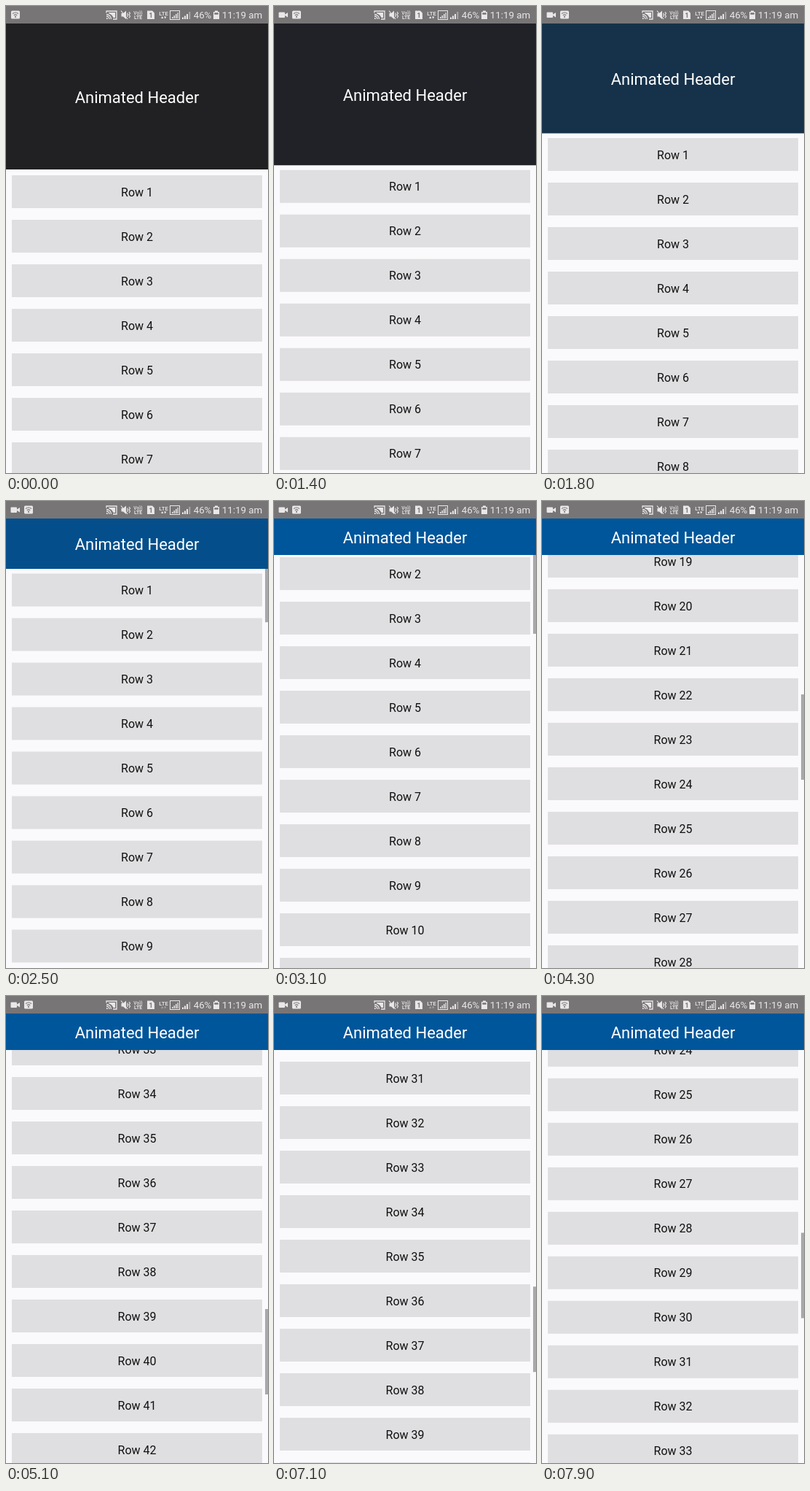
These frames come from a looping animation (360x640 px, 8 s). An HTML page:

```html
<!DOCTYPE html>
<html lang="en">
<head>
<meta charset="utf-8">
<title>Animated Header</title>
<style>
  html, body { margin: 0; width: 100%; height: 100%; overflow: hidden; background: #faf9fb; }
  svg { display: block; width: 100vw; height: 100vh; }
  text { font-family: Roboto, sans-serif; text-anchor: middle; }
  #rows rect { fill: #dfdee0; }
  #rows text { font-size: 16px; fill: #111; }
  #title { font-size: 22px; fill: #fff; }
  #status { fill: #e9e7e8; }
  #status .line { fill: none; stroke: #e9e7e8; }
  #status .cut { fill: #787577; }
</style>
</head>
<body>
<svg viewBox="0 0 360 640">
  <rect width="360" height="640" fill="#faf9fb"/>
  <g id="rows"></g>
  <rect id="thumb" x="356" width="4" height="117" fill="#a9a8aa"/>
  <rect id="header" y="24" width="360"/>
  <text id="title" x="180">Animated Header</text>

  <rect width="360" height="24" fill="#787577"/>
  <g id="status">
    <g id="camera">
      <rect x="6.5" y="8.5" width="8.5" height="7.5" rx="1"/>
      <path d="M15 11.5L19 9v6.500L15 13z"/>
    </g>
    <g id="wifi">
      <rect x="7" y="6.500" width="12" height="11" rx="1.500"/>
      <path d="M9 10.500q4-3 8 0M10.800 12.700q2.200-1.600 4.400 0" fill="none" stroke="#787577" stroke-width="1.200"/>
      <circle class="cut" cx="13" cy="14.800" r="1.100"/>
    </g>

    <path class="line" stroke-width="1.300" d="M138 9.500V7h14v11h-5M138 11.500a6.500 6.500 0 0 1 6.500 6.500M138 14a4 4 0 0 1 4 4"/>
    <path d="M138 16a2 2 0 0 1 2 2h-2zM141 9h9v7h-2.500a10 10 0 0 0-6.500-6z"/>

    <path d="M158.500 10h2.500l4-3.500v11.500l-4-3.500h-2.500z"/>
    <path class="line" stroke-width="1.200" d="M158 6.500L167 18M167 9.500v5.500M169 8l1.500 2-1.500 2 1.500 2-1.500 2.500"/>

    <text x="181.500" y="11.500" font-size="6.500" font-weight="500">Vo))</text>
    <text x="181.500" y="18" font-size="6.800" font-weight="700">LTE</text>

    <path d="M194 6.500h7l3 3V18h-10z"/>
    <text class="cut" x="199" y="16" font-size="9" font-weight="700">1</text>

    <text x="216.500" y="12.500" font-size="7.800" font-weight="500">LTE</text>
    <path id="arrows" d="M213 17l1.700-3 1.700 3zM217 14.500h3.400l-1.700 3z"/>

    <rect class="line" x="225.500" y="6.500" width="13" height="12" stroke-width="1"/>
    <path d="M228 15h1.500v2H228zM230.500 13h1.500v4h-1.500zM233 11h1.500v6H233zM235.500 9h1.200v8h-1.200z"/>
    <path d="M242 15.500h2V18h-2zM245 13.500h2V18h-2zM248 11h2v7h-2z"/>
    <path d="M251.300 8h2v10h-2z" opacity=".45"/>

    <text x="270" y="17.300" font-size="13.200">46%</text>
    <path d="M287 6.500h4V8h2v10h-8V8h2z"/>
    <path class="cut" d="M286.300 9.200h5.400v2.500h-5.400z"/>
    <text x="324.500" y="17.300" font-size="13.300">11:19 am</text>
  </g>
</svg>
<script>
  const LOOP = 8000, STEP = 100;
  const TOP = 24, TALL = 200, SHORT = 50;
  const ROWS = 50, PITCH = 61;
  const DARK = [33, 32, 34], BLUE = [0, 86, 154];

  // time, scroll offset, velocity in px per ms
  const scrollKeys = [
    [1300, 0, 0.06], [1800, 51, 0.12], [2500, 132.5, 0.13], [3600, 382, 0.5],
    [5100, 2134, 0], [6800, 2134, -0.45], [7100, 1972, -0.58], [8000, 1541, -0.42]
  ];

  const el = id => document.getElementById(id);
  const set = (id, attrs) => {
    for (const k in attrs) el(id).setAttribute(k, attrs[k]);
  };
  const clamp = (v, lo, hi) => Math.min(hi, Math.max(lo, v));

  let markup = '';
  for (let i = 0; i < ROWS; i++) {
    const y = 232 + i * PITCH;
    markup += `<rect x="8" y="${y}" width="344" height="45"/><text x="180" y="${y + 28.7}">Row ${i + 1}</text>`;
  }
  el('rows').innerHTML = markup;

  function scrollAt(t) {
    if (t <= scrollKeys[0][0]) return 0;
    const i = scrollKeys.findIndex(k => t <= k[0]);
    const [t0, p0, v0] = scrollKeys[i - 1], [t1, p1, v1] = scrollKeys[i];
    if (p0 === p1) return p0;
    const d = t1 - t0, u = (t - t0) / d, w = 1 - u;
    return w * w * ((1 + 2 * u) * p0 + u * d * v0) + u * u * ((3 - 2 * u) * p1 - w * d * v1);
  }

  function thumbAlpha(t) {
    if (t < 1400) return 0;
    if (t >= 6900) return 1;
    return clamp((5800 - t) / 300, 0, 1);
  }

  function draw(t) {
    const s = scrollAt(t);
    const height = clamp(TALL - Math.max(0, s - 1.5), SHORT, TALL);
    const mix = (TALL - height) / (TALL - SHORT);
    const color = DARK.map((c, i) => Math.round(c + (BLUE[i] - c) * mix));

    set('rows', { transform: `translate(0 ${-s})` });
    set('thumb', { y: TOP + s * 0.1898, opacity: thumbAlpha(t) });
    set('header', { height, fill: `rgb(${color})` });
    set('title', { y: TOP + height / 2 + 8.6 });

    const recording = t >= 100;
    set('camera', { opacity: recording ? 1 : 0 });
    set('wifi', { transform: `translate(${recording ? 18 : 0} 0)` });
    const busy = t < 4500 || (t >= 6600 && t < 7000);
    set('arrows', { opacity: busy ? 1 : 0.4 });
  }

  function tick() {
    const t = performance.now() % LOOP;
    draw(Math.floor(t / STEP) * STEP);
    requestAnimationFrame(tick);
  }
  tick();
</script>
</body>
</html>
```
